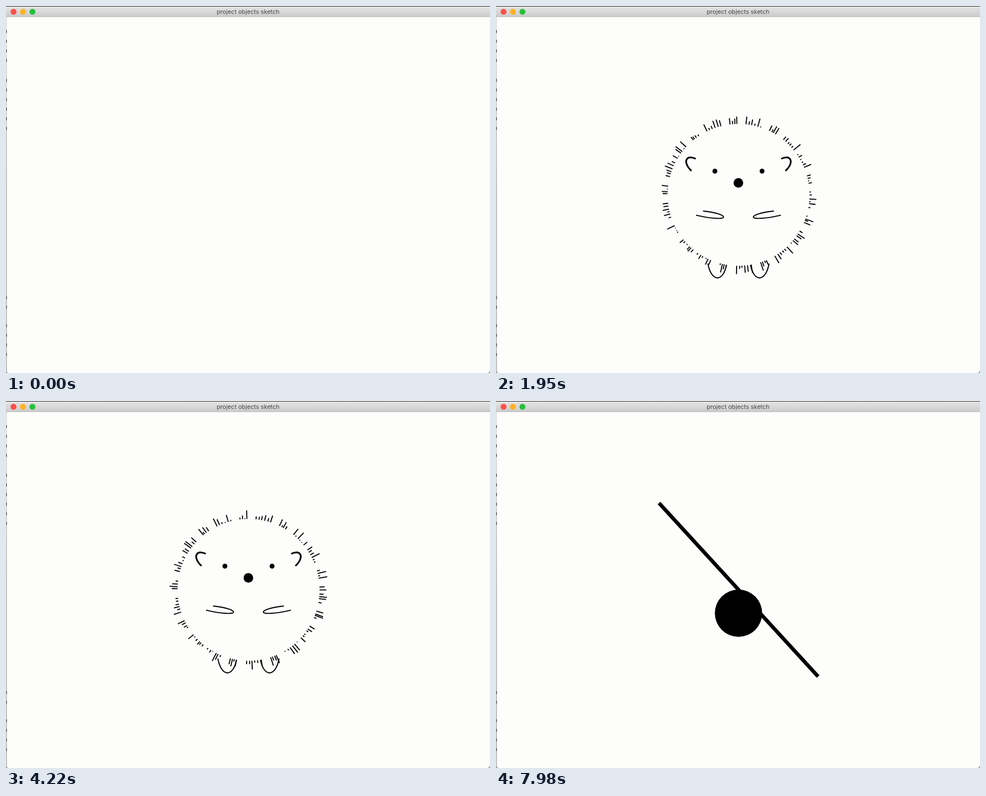
Write an HTML page with a canvas that moves like this. It is 859 by 652 pixels and loops after 8 s.

```html
<!DOCTYPE html>
<html lang="en">
<head>
<meta charset="utf-8">
<title>project objects sketch</title>
<style>
  html, body { margin: 0; width: 100%; height: 100%; overflow: hidden; background: #fdfdfb; }
  canvas { display: block; width: 859px; height: 652px; }
</style>
</head>
<body>
<canvas id="stage" width="859" height="652"></canvas>
<script>
const W = 859, H = 652, LOOP = 8000;
const SHOW_BODY = 20, SHOW_SEESAW = 4320;
const ctx = document.getElementById('stage').getContext('2d');

const BODY = { x: 430.5, y: 335.5, r: 126, spike: 16, tufts: 22 };
const MIRROR = 860.7;

const EAR = new Path2D('M354.5 271.5C338 263 330 277 347 293');
const HAND = new Path2D('M355 371.6C418 386 418 369.5 367.5 364.2');
const FOOT = new Path2D('M376 457.5C382 490.5 403 491.5 409 460');

// Seesaw turns: when each starts and ends, and the angle it reaches
const FIRST_TILT = 90;
const TURNS = [
  { from: 4790, to: 5940, angle: 18 },
  { from: 6640, to: 7120, angle: 77.4 },
  { from: 7500, to: 7830, angle: 132.5 }
];

function random(seed) {
  let n = Math.imul(seed ^ 0x9e3779b9, 0x85ebca6b);
  n = Math.imul(n ^ (n >>> 13), 0xc2b2ae35);
  return ((n ^ (n >>> 16)) >>> 0) / 4294967296;
}

// Evenly spaced tufts, two narrow ones in every five; angles clockwise from the top
function makeSpikes() {
  const spikes = [];
  const pitch = 360 / BODY.tufts;
  for (let i = 0; i < BODY.tufts; i++) {
    const narrow = i % 5 === 1 || i % 5 === 4;
    const count = narrow ? 4 : 6;
    const spread = narrow ? 5.6 : 11.6;
    for (let k = 0; k < count; k++) {
      const jitter = random(i * 10 + k) - 0.5;
      const deg = 12.2 + i * pitch + spread * (k / (count - 1) - 0.5) + jitter;
      spikes.push(deg * Math.PI / 180);
    }
  }
  return spikes;
}
const SPIKES = makeSpikes();

function disc(x, y, r, color = '#000') {
  ctx.fillStyle = color;
  ctx.beginPath();
  ctx.arc(x, y, r, 0, Math.PI * 2);
  ctx.fill();
}

function box(x, y, w, h, color) {
  ctx.fillStyle = color;
  ctx.fillRect(x, y, w, h);
}

function verticalFade(y0, y1, ...colors) {
  const fade = ctx.createLinearGradient(0, y0, 0, y1);
  colors.forEach((color, i) => fade.addColorStop(i / (colors.length - 1), color));
  return fade;
}

// Slivers of text lines from a window behind this one
function drawSlivers(y, lines) {
  for (let i = 0; i < lines; i++) box(0, y + i * 17.1 - 2.5, 1.4, 5, '#555');
}

function drawWindow() {
  box(0, 0, W, H, '#fdfdfb');

  box(0, 19, 1.5, H - 19, verticalFade(19, H, '#e0e0e0', '#b0b0b0', '#b0b0b0'));
  drawSlivers(45.5, 4);
  drawSlivers(132, 6);
  drawSlivers(518, 2);
  drawSlivers(568, 4);

  box(0, 0, W, 19, verticalFade(0, 19, '#e6e6e6', '#cbcbcb'));
  box(0, 18.5, W, 1, '#b5b5b5');
  box(0, 0, W, 1, '#3b3330');

  disc(13.4, 10.2, 5.3, '#fc4f48');
  disc(30.1, 10.2, 5.3, '#fdb225');
  disc(46.9, 10.2, 5.3, '#27c03c');

  ctx.fillStyle = '#474747';
  ctx.font = '10.7px Inter, Roboto, sans-serif';
  ctx.textAlign = 'center';
  ctx.fillText('project objects sketch', 429.7, 14.2);

  // rounded lower corners
  ctx.fillStyle = '#9c9c9c';
  ctx.fill(new Path2D('M0 647Q1 652 6 652H0ZM859 647Q858 652 853 652H859Z'));
}

// Spikes are redrawn in an uneven beat: one long hold, then three short ones
function beat(t) {
  const shifted = t + 60;
  const phase = shifted % 180;
  const step = phase < 100 ? 0 : phase < 120 ? 1 : phase < 160 ? 2 : 3;
  return Math.floor(shifted / 180) * 4 + step;
}

function drawSpikes(t) {
  const seed = beat(t) * 1000;
  ctx.lineWidth = 1.8;
  ctx.beginPath();
  SPIKES.forEach((a, i) => {
    const dx = Math.sin(a), dy = -Math.cos(a);
    const end = BODY.r + 0.8 + random(seed + i) * (BODY.spike - 0.8);
    ctx.moveTo(BODY.x + dx * BODY.r, BODY.y + dy * BODY.r);
    ctx.lineTo(BODY.x + dx * end, BODY.y + dy * end);
  });
  ctx.stroke();
}

function drawSide() {
  ctx.lineWidth = 3;
  ctx.stroke(EAR);
  ctx.lineWidth = 1.9;
  ctx.stroke(HAND);
  ctx.stroke(FOOT);
  disc(388.5, 293.4, 4.3);
}

function drawHedgehog(t) {
  ctx.strokeStyle = '#000';
  drawSpikes(t);
  drawSide();
  ctx.save();
  ctx.translate(MIRROR, 0);
  ctx.scale(-1, 1);
  drawSide();
  ctx.restore();
  disc(430.2, 314.3, 8.5);
}

function tiltAt(t) {
  let tilt = FIRST_TILT;
  for (const { from, to, angle } of TURNS) {
    const p = Math.min(1, Math.max(0, (t - from) / (to - from)));
    tilt += (angle - tilt) * p;
  }
  return tilt;
}

function drawSeesaw(t) {
  disc(430.4, 377, 42);
  ctx.save();
  ctx.translate(430.5, 335.4);
  ctx.rotate(-tiltAt(t) * Math.PI / 180);
  box(-209, -3.3, 418, 6.6, '#000');
  ctx.restore();
}

function draw(t) {
  drawWindow();
  if (t >= SHOW_SEESAW) drawSeesaw(t);
  else if (t >= SHOW_BODY) drawHedgehog(t);
}

const start = performance.now();
function tick() {
  draw((performance.now() - start) % LOOP);
  requestAnimationFrame(tick);
}
tick();
</script>
</body>
</html>
```
